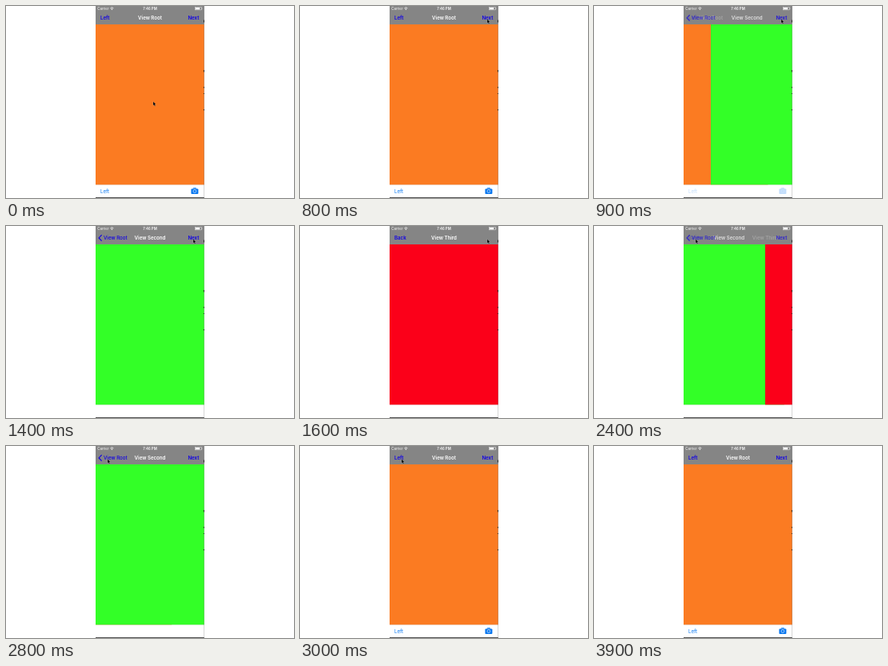
An HTML page with a canvas for the animation above (4000 ms loop, 360x240 px).

```html
<!DOCTYPE html>
<html lang="en">
<head>
<meta charset="utf-8">
<title>Navigation stack</title>
<style>
html, body { margin: 0; width: 100%; height: 100%; overflow: hidden; background: #fff; }
canvas { display: block; width: 360px; height: 240px; }
</style>
</head>
<body>
<canvas></canvas>
<script>
const LOOP = 4000, STEP = 100;
const LEFT = 112, WIDTH = 136, BAR = 23, FOOT = 223.5;
const BLUE = '#1000e6', TINT = '#0a78f0';

const views = [
  { title: 'View Root', color: '#fb7b22', left: 'Left', next: true, tools: true },
  { title: 'View Second', color: '#33ff27', left: 'View Root', arrow: true, next: true },
  { title: 'View Third', color: '#fb0019', left: 'Back' }
];
// Each slide: start time, from view, to view
const slides = [[800, 0, 1], [1400, 1, 2], [2300, 2, 1], [2800, 1, 0]];
const SLIDE = 200;
// Pointer path: time, x, y
const path = [[0, 184, 119.5], [100, 184, 119.5], [700, 234, 16.5], [1700, 234, 16.5],
  [2200, 127, 16.5], [3300, 127, 16.5], [3800, 160, -10], [4000, 160, -10]];

const canvas = document.querySelector('canvas');
const ctx = canvas.getContext('2d');
const ratio = Math.max(1, window.devicePixelRatio || 1);
canvas.width = 360 * ratio;
canvas.height = 240 * ratio;
ctx.scale(ratio, ratio);

const smooth = p => p * p * (3 - 2 * p);
const easeOut = p => 1 - (1 - p) ** 2;

function rect(x, y, w, h, color) {
  ctx.fillStyle = color;
  ctx.fillRect(x, y, w, h);
}

function text(label, x, y, color, size = 6.15, weight = 600, align = 'left') {
  ctx.font = `${weight} ${size}px Inter, "Liberation Sans", sans-serif`;
  ctx.textAlign = align;
  ctx.fillStyle = color;
  ctx.fillText(label, x, y);
}

function poly(points, color) {
  ctx.beginPath();
  points.forEach(([x, y]) => ctx.lineTo(x, y));
  ctx.closePath();
  ctx.fillStyle = color;
  ctx.fill();
}

function withAlpha(alpha, draw) {
  ctx.save();
  ctx.globalAlpha = alpha;
  draw();
  ctx.restore();
}

function statusBar() {
  text('Carrier', 114.3, 4.9, '#fff', 4.35, 400);
  text('7:46 PM', 180, 4.9, '#fff', 4.35, 600, 'center');
  ctx.strokeStyle = '#fff';
  ctx.lineWidth = 0.7;
  for (const r of [1.4, 2.7]) {
    ctx.beginPath();
    ctx.arc(132.4, 4.6, r, -Math.PI * 0.78, -Math.PI * 0.22);
    ctx.stroke();
  }
  rect(131.9, 4, 1, 0.9, '#fff');
  ctx.lineWidth = 0.4;
  ctx.strokeRect(236.2, 1.5, 8, 3.4);
  rect(236.8, 2, 5.4, 2.4, '#fff');
  rect(244.6, 2.6, 0.6, 1.2, '#fff');
}

function camera() {
  ctx.fillStyle = TINT;
  ctx.beginPath();
  ctx.roundRect(231.4, 228.4, 9, 6.5, 1);
  ctx.fill();
  poly([[233.4, 228.6], [234.3, 227.2], [237.5, 227.2], [238.4, 228.6]], TINT);
  ctx.strokeStyle = '#fff';
  ctx.lineWidth = 0.6;
  ctx.beginPath();
  ctx.arc(235.9, 231.5, 1.9, 0, 2 * Math.PI);
  ctx.stroke();
}

function chrome(view, offset, alpha, pressed) {
  withAlpha(alpha, () => {
    text(view.title, 180 + offset, 17.1, '#fff', 6.15, 600, 'center');
    text(view.left, view.arrow ? 122 : 118, 17.1, BLUE, 6.15, view.arrow ? 500 : 600);
    if (view.arrow) {
      ctx.strokeStyle = BLUE;
      ctx.lineWidth = 1.2;
      ctx.beginPath();
      ctx.moveTo(119.6, 11.2);
      ctx.lineTo(116.1, 14.9);
      ctx.lineTo(119.6, 18.6);
      ctx.stroke();
    }
    if (view.next) text('Next', 241.3, 17.1, pressed ? '#6c62a4' : BLUE, 6.15, 600, 'right');
    if (view.tools) {
      text('Left', 118, 233.7, TINT, 6.15, 400);
      camera();
    }
  });
}

function page(view, offset) {
  rect(LEFT + offset, BAR, WIDTH, FOOT - BAR, view.color);
}

function pointer(t) {
  const i = path.findIndex(([time]) => time > t);
  const [t0, x0, y0] = path[i - 1], [t1, x1, y1] = path[i];
  const p = smooth((t - t0) / (t1 - t0));
  ctx.save();
  ctx.translate(x0 + (x1 - x0) * p, y0 + (y1 - y0) * p);
  const arrow = [[0, 0], [0, 4.8], [1.1, 3.9], [1.9, 5.8], [2.8, 5.4], [2, 3.6], [3.4, 3.5]];
  poly(arrow, '#000');
  ctx.strokeStyle = 'rgba(255,255,255,.5)';
  ctx.lineWidth = 0.3;
  ctx.stroke();
  ctx.restore();
}

function draw(t) {
  const [start, from, to] = slides.findLast(s => s[0] <= t) || [-SLIDE, 0, 0];
  const p = easeOut(Math.min(1, (t - start) / SLIDE));
  const push = to > from;

  rect(0, 0, 360, 240, '#fff');
  ctx.save();
  ctx.beginPath();
  ctx.rect(LEFT, 0, WIDTH, 240);
  ctx.clip();
  if (p === 1) {
    page(views[to], 0);
  } else {
    const open = push ? p : 1 - p;
    page(views[Math.min(from, to)], -0.3 * WIDTH * open);
    page(views[Math.max(from, to)], WIDTH * (1 - open));
  }
  rect(LEFT, 0, WIDTH, BAR, '#858585');
  rect(LEFT, FOOT, WIDTH, 0.3, '#ccc');
  statusBar();
  const dir = push ? 1 : -1;
  if (p < 1) chrome(views[from], -45 * dir * p, 1 - p);
  chrome(views[to], 45 * dir * (1 - p), p, t >= 1300 && t < 1500);
  ctx.restore();

  // Window edges
  rect(LEFT, 239, WIDTH, 1, '#555');
  rect(247.6, 0, 0.4, 240, '#999');
  for (const [y, h] of [[17.5, 3], [80, 2.5], [101, 1.5], [109, 1], [129, 1.5]])
    rect(247.1, y, 0.9, h, '#222');
  pointer(t);
}

function tick() {
  const t = performance.now() % LOOP;
  draw(Math.floor(t / STEP) * STEP);
  requestAnimationFrame(tick);
}
tick();
</script>
</body>
</html>
```
